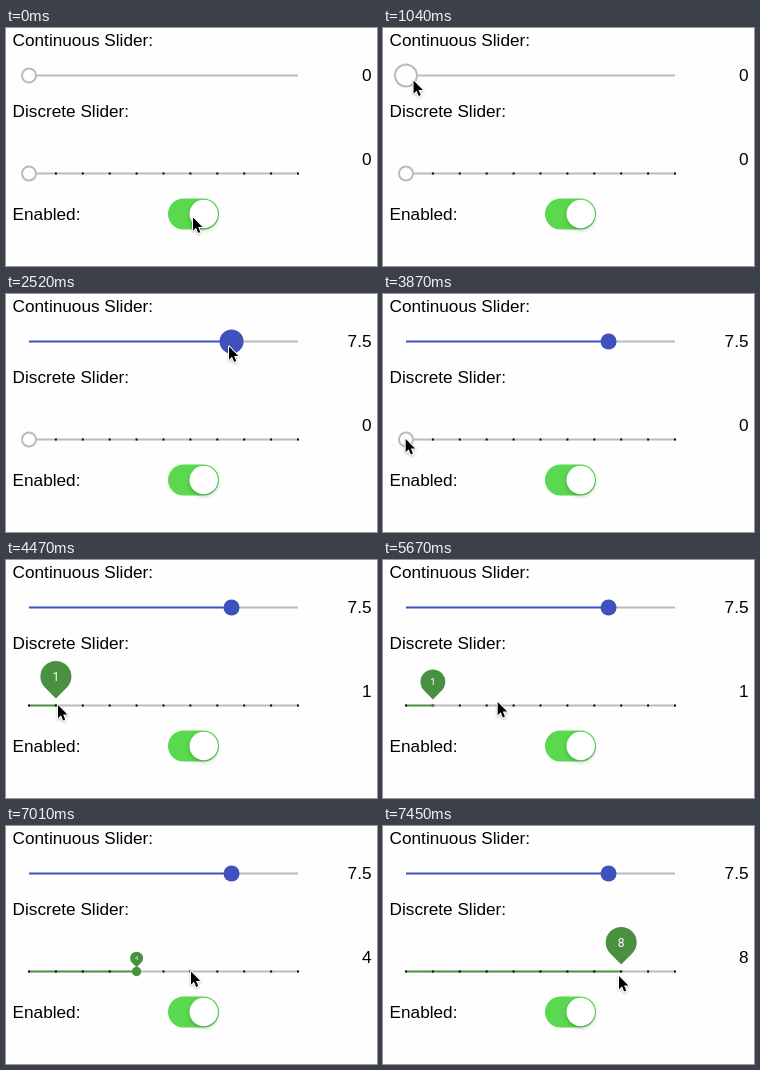
These frames come from a looping animation (371x238 px, 8 s). An HTML page:

```html
<!DOCTYPE html>
<html lang="en">
<head>
<meta charset="utf-8">
<title>Sliders</title>
<style>
  html, body { margin: 0; width: 100%; height: 100%; overflow: hidden; background: #fefefe; }
  svg { display: block; width: 100%; height: 100%; }
  text { font: 17.2px "Liberation Sans", Arial, sans-serif; fill: #000; }
  .value { text-anchor: end; }
  .bubble text { font: 12px Roboto, sans-serif; fill: #fff; text-anchor: middle; }
  line { stroke-width: 2; }
  .track { stroke: #bbb; }
  .blue { stroke: #3f51bd; }
  .green { stroke: #4a9041; }
  .ticks { stroke: #000; stroke-width: 2; }
  .knob { fill: #fff; filter: drop-shadow(0 2.5px 2px rgba(0, 0, 0, .22)); }
  .cursor { fill: #000; stroke: #fff; stroke-width: 2; paint-order: stroke; stroke-linejoin: round;
    filter: drop-shadow(0 1px 1px rgba(0, 0, 0, .25)); }
</style>
</head>
<body>
<svg viewBox="0 0 371 238">
  <text x="6.6" y="18">Continuous Slider:</text>
  <text x="6.6" y="88.5">Discrete Slider:</text>
  <text x="6.6" y="192">Enabled:</text>
  <text class="value" id="value1" x="365.5" y="53"></text>
  <text class="value" id="value2" x="365.5" y="137"></text>

  <line class="track" id="rest1" x2="292" y1="47.5" y2="47.5"/>
  <line class="blue" id="fill1" x1="23" y1="47.5" y2="47.5"/>
  <circle id="thumb1" cy="47.5"/>

  <line class="track" id="rest2" x2="292" y1="145.5" y2="145.5"/>
  <line class="green" id="fill2" x1="23" y1="145.5" y2="145.5"/>
  <path class="ticks" id="ticks"/>
  <circle id="thumb2" cy="145.5"/>
  <g class="bubble" id="bubble">
    <path fill="#4a9041" d="M0 0L-10.96 -10.96A15.5 15.5 0 1 1 10.96 -10.96Z"/>
    <text y="-17.6" id="bubbleText"></text>
  </g>

  <rect x="162" y="170.5" width="51" height="31" rx="15.5" fill="#5ad84f"/>
  <circle class="knob" cx="197.7" cy="186" r="14.2"/>
  <path class="cursor" id="cursor" d="M0 0V13.2L3 10.3 5.2 15.5 7.2 14.6 5.1 9.6H9.4Z"/>
</svg>
<script>
const LOOP = 8000, LEFT = 23, UNIT = 26.9;
const $ = id => document.getElementById(id);
const set = (id, attrs) => {
  for (const name in attrs) $(id).setAttribute(name, attrs[name]);
};

const ease = p => p * p * (3 - 2 * p);
const clamp = p => Math.min(1, Math.max(0, p));

// A value that starts somewhere and makes eased moves: [from tick, to tick, new value].
const track = (start, ...moves) => tick => moves.reduce(
  (value, [from, to, end]) => value + (end - value) * ease(clamp((tick - from) / (to - from))), start);

const cursorX = track(187, [0, 5, 24], [6, 15.2, 223], [21, 26, 22.7], [28, 30, 52],
  [37, 38, 114.7], [38, 39, 131], [46, 47, 185], [47, 50, 236]);
const cursorY = track(189.5, [0, 5, 52.5], [21, 25, 154], [25, 26, 145], [32, 34, 150],
  [37, 38, 142], [38, 39, 145.5], [47, 50, 150]);
const press = track(0, [5, 7, 1], [21, 23, 0]);
const position1 = track(0, [8.2, 17, 7.53]);
const reading1 = track(0, [7.9, 16.8, 7.5]);
const position2 = track(0, [28, 30, 1], [38, 40, 4], [47, 50, 8]);
const pop = track(0, [26, 28, 1], [32, 34, 0], [37, 38.4, 1], [42, 44, 0], [46.2, 48, 1]);

// The picture advances in coarse ticks, a little slower in the second part.
const tickAt = t => t < 2520 ? Math.floor(t / 148.2) : 17 + Math.floor((t - 2520) / 149.4);

function drawSlider(n, position, radius, color) {
  const x = LEFT + UNIT * position, hollow = position === 0;
  set("fill" + n, { x2: x });
  set("rest" + n, { x1: x });
  set("thumb" + n, {
    cx: x,
    r: Math.max(0, hollow ? radius - 1 : radius),
    fill: hollow ? "#fefefe" : color,
    stroke: hollow && radius > 1 ? "#bbb" : "none",
    "stroke-width": 2
  });
  return x;
}

function draw(time) {
  const tick = tickAt(time % LOOP), scale = pop(tick), place = position2(tick);

  drawSlider(1, position1(tick), 8 + 4 * press(tick), "#3f51bd");
  const x = drawSlider(2, place, 8 * (1 - scale), "#4a9041");
  set("bubble", { transform: `translate(${x} ${138.4 + 5 * (1 - scale)}) scale(${scale})` });
  set("cursor", { transform: `translate(${cursorX(tick)} ${cursorY(tick)})` });

  $("value1").textContent = +reading1(tick).toFixed(1);
  $("value2").textContent = $("bubbleText").textContent = Math.ceil(place);
}

set("ticks", {
  d: Array.from({ length: 11 }, (_, i) => `M${LEFT + UNIT * i - 1} 145.5h2`).join("")
});

const start = performance.now();
function frame() {
  draw(performance.now() - start);
  requestAnimationFrame(frame);
}
draw(0);
requestAnimationFrame(frame);
</script>
</body>
</html>
```
